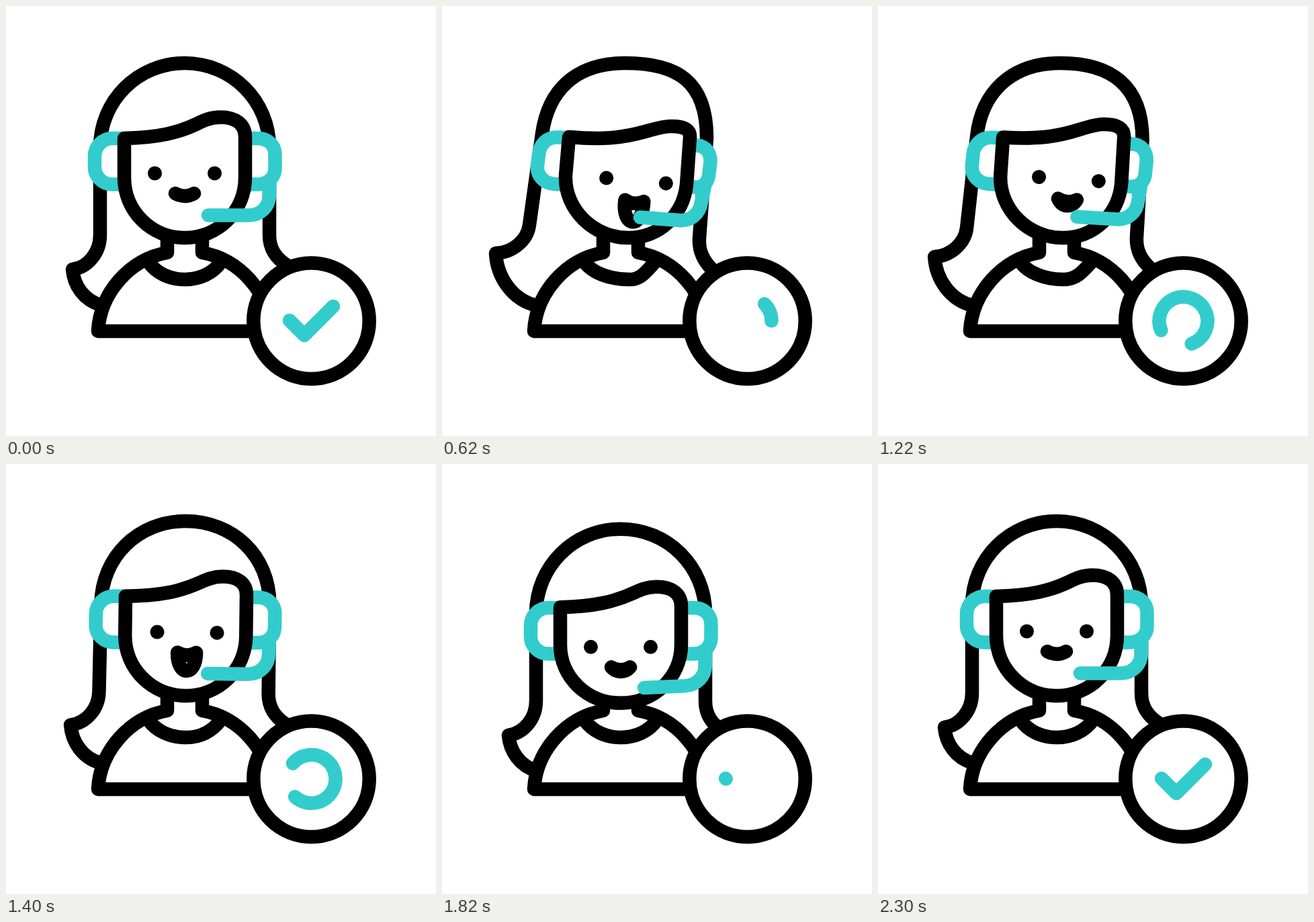
An HTML page that plays this animation: 640 px wide and 640 px high, repeating every 2400 ms.

```html
<!DOCTYPE html>
<html lang="en">
<head>
<meta charset="utf-8">
<title>Support agent</title>
<style>
html, body { margin: 0; width: 100%; height: 100%; overflow: hidden; background: #fff; }
svg { display: block; width: 100%; height: 100%; }
svg * { stroke-width: 20.5; stroke-linecap: round; stroke-linejoin: round; }
.line { fill: none; stroke: #000; }
.teal { fill: none; stroke: #3cc; }
.solid { fill: #fff; }
</style>
</head>
<body>
<svg viewBox="0 0 640 640">
  <path id="hair" class="line"/>
  <path class="line" d="M240 345V367C184 377 140 427 137 484H372M292 345V367C348 377 392 427 395 484"/>
  <path id="collar" class="line"/>
  <path id="earL" class="teal solid"/>
  <path id="earR" class="teal solid"/>
  <path id="face" class="line solid"/>
  <g id="features">
    <circle cx="221.5" cy="249" r="10.5"/>
    <circle cx="310.5" cy="249" r="10.5"/>
    <path id="mouth" class="line"/>
  </g>
  <path id="mic" class="teal"/>
  <circle class="line solid" cx="454.5" cy="468.8" r="86.2"/>
  <path id="check" class="teal" pathLength="1" d="M422 468L444 490L487 447"/>
  <circle id="spinner" class="teal" pathLength="360" cx="454.5" cy="468.8" r="36"/>
</svg>
<script>
const $ = id => document.getElementById(id);

// Each part: upright path, tilted path, and how far each point sinks in a nod.
const parts = {
  hair: [
    'M141 445C116 438 101 416 99 392C122 389 140 367 140 341L140 211C140 141 196 85 266 85C336 85 392 141 392 211L392 341C392 362 402 376 420 387',
    'M141 446C106 438 82 405 80 368C105 367 127 349 130 326L149 190C158 127 197 85 273 85C350 85 394 112 394 196L383 346C382 364 388 378 402 392',
    () => 13],
  collar: [
    'M212 381C224 398 244 407 266 407C288 407 308 398 320 381',
    'M212 381C222 396 248 407 279 407C296 407 303 396 317 381',
    () => 0],
  earL: [
    'M176 197L158 197C144 197 132 209 132 223L132 240C132 254 144 265.5 158 265.5L176 265.5',
    'M189 196L172 195.5C156 195 145 206 144 222L142 238C141 253 152 264 168 265L184 266',
    () => 19],
  earR: [
    'M362 197L374 197C390 197 400.5 207 400.5 221L400.5 241C400.5 255 390 265.5 374 265.5L362 265.5',
    'M372 207L380 207.5C393 209 400 219 399.5 232L397 253C395 265 386 271 375 269.5L366 269',
    () => 19],
  face: [
    'M176 197L176 255C176 305 216 345 266 345C316 345 356 305 356 255L356 195C356 176 342 165.5 319 165.5C304 165.5 293 171 285 175C258 188 228 196 176 197Z',
    'M189 195L184 252C182 303 226 345 277 345C325 345 359 310 364 266L369 196C370 184 361 179 341 179C328 179 317 183 302 187C266 197 238 199 189 195Z',
    (x, y) => 18 - (y - 197) * .04],
  mic: [
    'M392 262L392 281C392 299 379 311.5 361 311.5L301 311.5',
    'M391 268L386 292C383 310 370 320.5 353 319L295 314.5',
    x => 24 - (x - 301) * .05]
};

const pair = /([\d.]+) ([\d.]+)/g;

function pose([upright, tilted, sink], tilt, nod) {
  const ends = [...tilted.matchAll(pair)];
  let i = 0;
  return upright.replace(pair, (_, x, y) => {
    const [, tx, ty] = ends[i++];
    const px = +x + (tx - x) * tilt;
    const py = +y + (ty - y) * tilt + sink(+x, +y) * nod;
    return px.toFixed(2) + ' ' + py.toFixed(2);
  });
}

function trim(el, start, end) {
  el.style.display = end - start > .001 ? '' : 'none';
  el.setAttribute('stroke-dasharray', `${end - start} 999`);
  el.setAttribute('stroke-dashoffset', -start);
}

function draw(now) {
  const t = now % 2400;
  const ease = (from, to) => {
    const u = Math.min(1, Math.max(0, (t - from) / (to - from)));
    return u * u * (3 - 2 * u);
  };

  const tilt = ease(200, 600) - ease(1100, 1500);
  const nod = ease(1500, 1900) - ease(1900, 2300);
  for (const id in parts) $(id).setAttribute('d', pose(parts[id], tilt, nod));
  $('features').setAttribute('transform',
    `translate(${23 * tilt} ${11 * tilt + 26 * nod}) rotate(${5.1 * tilt} 266 249)`);

  const open = ease(200, 600) - ease(900, 1100) + ease(1100, 1500) - ease(1500, 1900);
  const low = 284 + 37 * open, wide = 5 + 11 * open;
  $('mouth').setAttribute('d',
    `M252 279C261 284 271 284 280 279C${266 + wide} ${low} ${266 - wide} ${low} 252 279Z`);

  // The tick wipes away, a ring spins once, the tick is drawn again.
  if (t < 1200) trim($('check'), ease(250, 600), 1);
  else trim($('check'), 0, ease(1800, 2140));
  trim($('spinner'), 0, 273 * (ease(580, 740) - ease(1680, 1820)));
  const turn = -69 + 360 * ease(400, 1800) + 273 * ease(1680, 1820);
  $('spinner').setAttribute('transform', `rotate(${turn} 454.5 468.8)`);
}

const begin = performance.now();
function tick() {
  draw(performance.now() - begin);
  requestAnimationFrame(tick);
}
tick();
</script>
</body>
</html>
```
